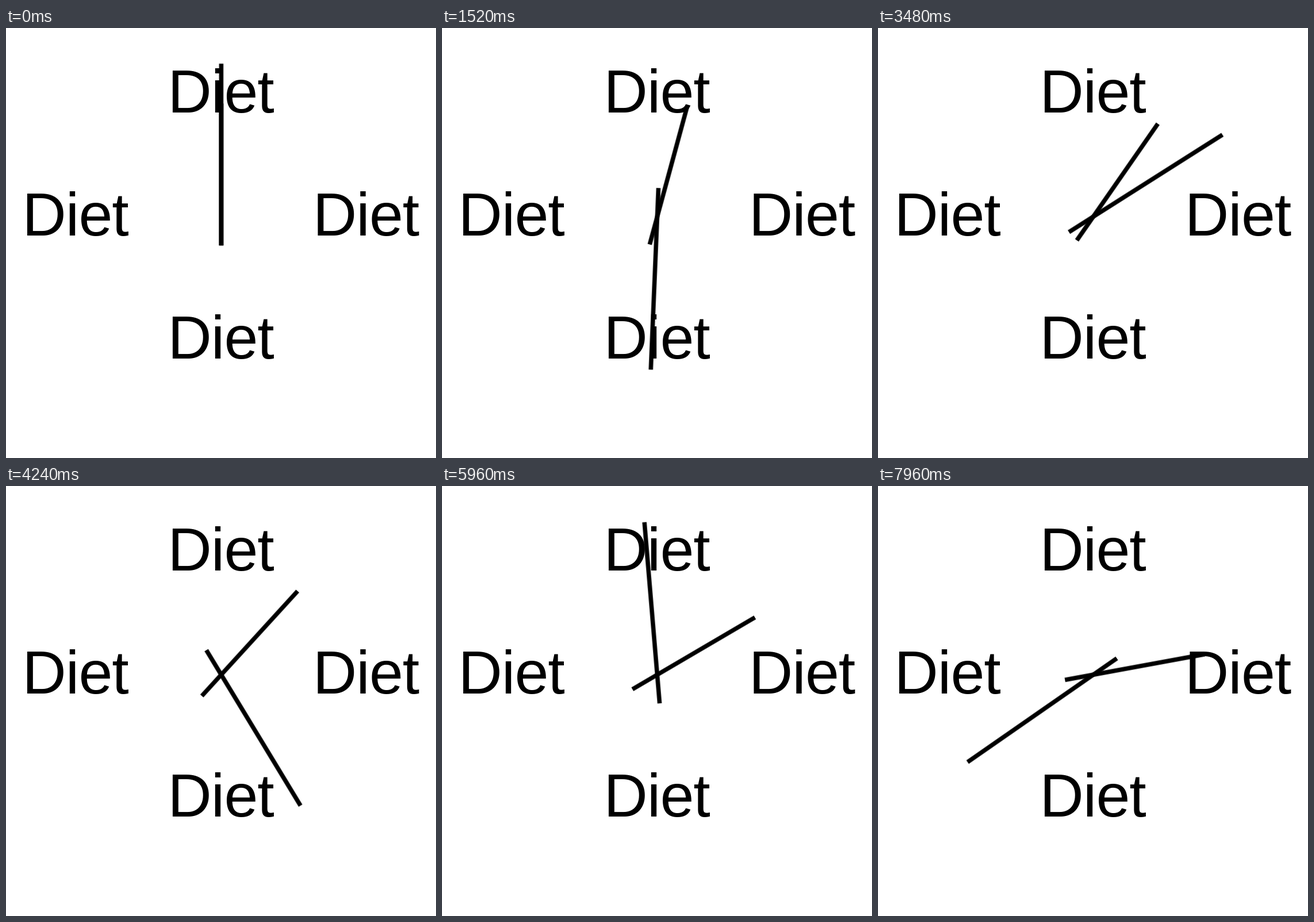
Recreate the animation shown at these times as an HTML page. Size 748 by 748 pixels, loop 8000 ms.

```html
<!DOCTYPE html>
<html lang="en">
<head>
<meta charset="utf-8">
<title>Clock</title>
<style>
  html, body { margin: 0; width: 100%; height: 100%; overflow: hidden; background: #fff; }
  svg { display: block; width: 100%; height: 100%; }
  text { font: 106px "Liberation Sans", Arial, sans-serif; letter-spacing: -1px; }
  line { stroke: #000; stroke-width: 7.5; }
  .hour, .minute { animation: turn 8s steps(200) infinite; }
  .hour { --sweep: 80deg; }
  .minute { --sweep: 960deg; }
  @keyframes turn {
    from { transform: rotate(0deg); }
    to { transform: rotate(var(--sweep)); }
  }
</style>
</head>
<body>
<svg viewBox="0 0 748 748">
  <text x="281.3" y="147">Diet</text>
  <text x="28.3" y="361">Diet</text>
  <text x="533.8" y="361">Diet</text>
  <text x="281.3" y="575">Diet</text>
  <g transform="translate(374.4 328.3)">
    <line class="hour" y1="50" y2="-197"/>
    <line class="minute" y1="50" y2="-266.3"/>
  </g>
</svg>
</body>
</html>
```
